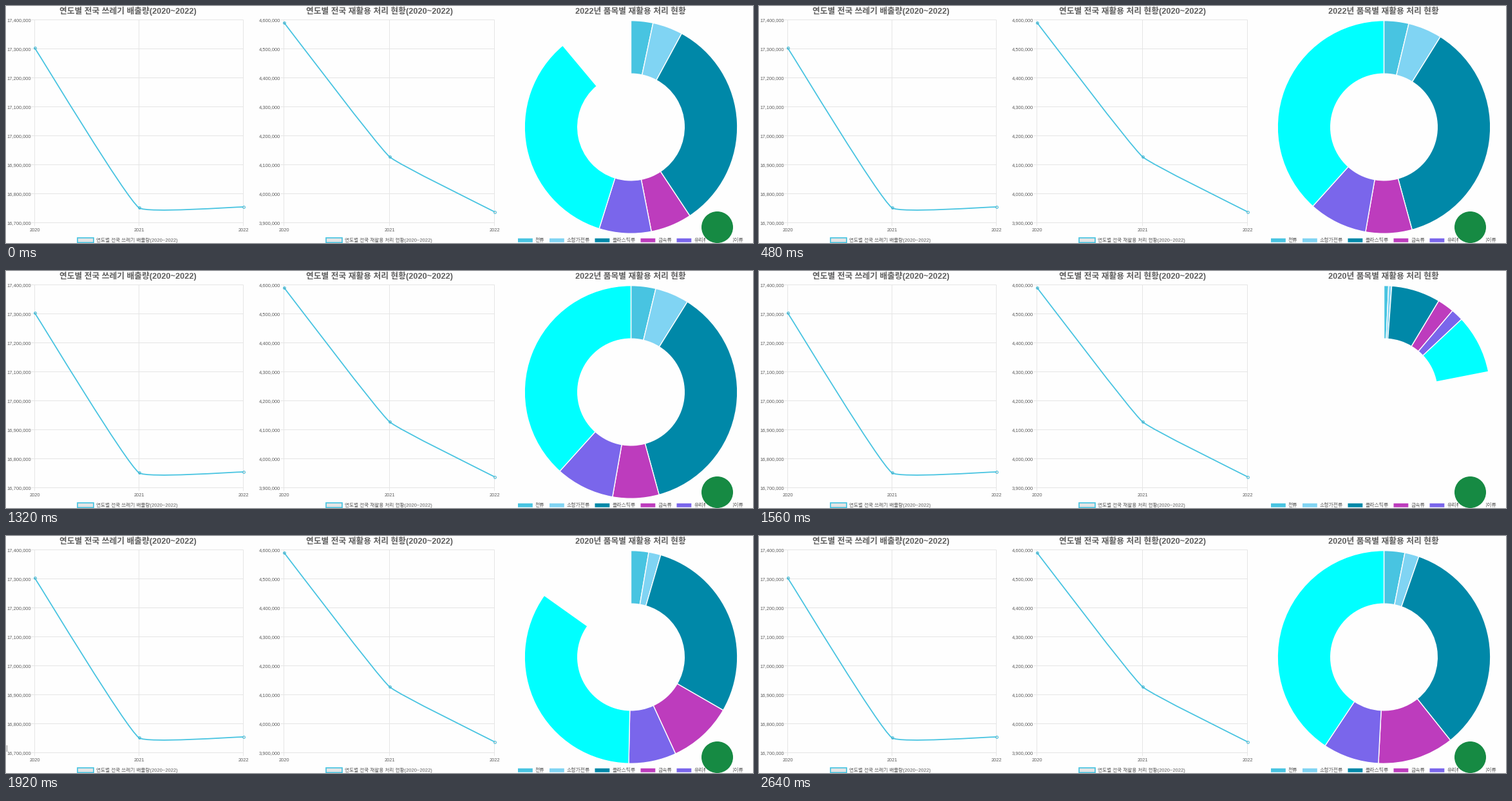
A matplotlib script that plays this animation: 1160 by 368 pixels, repeating every 2.76 s.

```python
import numpy as np
import matplotlib.pyplot as plt
from matplotlib.animation import FuncAnimation
from matplotlib.patches import Circle, PathPatch, Rectangle, Wedge
from matplotlib.path import Path

W, H, DPI = 1160, 368, 100
STEP, FRAMES = 120, 23
PX = 72 / DPI  # points per pixel
BG, GRID, INK, BLUE = "#fefefe", "#e5e5e5", "#5f5f5f", "#48c4e1"

plt.rcParams["font.family"] = ["Liberation Sans", "Noto Sans CJK JP"]

fig = plt.figure(figsize=(W / DPI, H / DPI), dpi=DPI, facecolor=BG)
ax = fig.add_axes([0, 0, 1, 1])
ax.set_xlim(0, W)
ax.set_ylim(H, 0)
ax.axis("off")


def label(x, y, text, size=7.5, ha="center", **kw):
    return ax.text(x, y, text, fontsize=size * PX, color=INK, ha=ha,
                   va="baseline", **kw)


def title(x, text):
    return label(x, 12, text, 12.8, weight="bold")


def rule(x0, y0, x1, y1):
    ax.plot([x0, x1], [y0, y1], color=GRID, lw=PX, zorder=1,
            solid_capstyle="butt", snap=False)


def box(x, y, w, h, **kw):
    ax.add_patch(Rectangle((x, y), w, h, snap=False, **kw))


def spline(points, tension=0.1):
    """Bezier path through three points with length-weighted handles."""
    a, b, c = np.array(points, float)
    d0, d1 = np.hypot(*(b - a)), np.hypot(*(c - b))
    pull = tension * (c - a) / (d0 + d1)
    verts = [a, a + tension * (b - a), b - d0 * pull, b,
             b + d1 * pull, c - tension * (c - b), c]
    return Path(verts, [Path.MOVETO] + [Path.CURVE4] * 6)


def line_chart(xs, ys, top, name, title_x, legend_x):
    y0, y1 = 21.5, 336.5
    for k in range(8):
        y = y0 + 45 * k
        rule(xs[0] - 5, y, xs[2], y)
        label(xs[0] - 5.7, y + 2.7, f"{top - 100_000 * k:,}", ha="right")
    for x, year in zip(xs, (2020, 2021, 2022)):
        rule(x, y0, x, y1 + 5)
        label(x, 349.9, str(year))

    points = list(zip(xs, ys))
    ax.add_patch(PathPatch(spline(points), fc="none", ec=BLUE,
                           lw=1.8 * PX, zorder=3))
    ax.plot(xs, ys, "o", ms=4 * PX, mfc=(0, 0, 0, 0.1), mec=BLUE,
            mew=0.9 * PX, zorder=4, snap=False)

    title(title_x, name)
    box(legend_x, 360, 25, 7.3, fc=GRID, ec=BLUE, lw=1.7 * PX)
    label(legend_x + 29, 366, name, 7.65, ha="left")


line_chart((44.5, 206.5, 368.5), (65, 313.3, 312), 17_400_000,
           "연도별 전국 쓰레기 배출량(2020~2022)", 189.7, 111)
line_chart((431.5, 595.5, 758.5), (25.5, 234, 319.5), 4_600_000,
           "연도별 전국 재활용 처리 현황(2020~2022)", 580, 497)

# Doughnut: kind, colour, legend position
KINDS = [("천류", BLUE, 795), ("소형가전류", "#80d4f3", 844),
         ("플라스틱류", "#0088a8", 914.5), ("금속류", "#bd3cbd", 985.5),
         ("유리류", "#7a66eb", 1041.5), ("종이류", "#00ffff", 1097)]
# Slice boundaries in degrees clockwise from the top
BOUNDS = {2022: np.array([0, 13.5, 32, 164.7, 190, 222, 360]),
          2020: np.array([0, 11.35, 19.15, 141.4, 183, 213.6, 360])}

ring_title = title(970, "")
slices = []
for kind, color, x in KINDS:
    wedge = Wedge((970.5, 188), 165.3, 0, 1, width=82.5, fc=color,
                  ec=BG, lw=1.4 * PX, joinstyle="bevel", zorder=3)
    slices.append(ax.add_patch(wedge))
    box(x, 360.8, 22.8, 6, fc=color, lw=0)
    label(x + 27, 366, kind, 7.9, ha="left")

# Floating button hiding part of the legend
box(1086, 358, 43, 10, fc=BG, lw=0, zorder=5)
ax.add_patch(Circle((1104.5, 343.5), 24.5, fc="#168a43", lw=0, zorder=6))
caret, = ax.plot([0.5, 0.5], [325, 334], color="#888888", lw=PX, zorder=5)


def ease_out_quart(t):
    return 1 - (1 - t) ** 4


def update(i):
    ms = i * STEP
    if ms < 1560:
        year, t = 2022, min(1, 0.423 + ms / 1000)
    else:
        year = 2020
        t = np.interp(ms, [1560, 1680, 1920, 2160, 2520],
                      [0.06, 0.175, 0.376, 0.645, 1])
    ring_title.set_text(f"{year}년 품목별 재활용 처리 현황")
    edges = BOUNDS[year] * ease_out_quart(t) - 90
    for wedge, a, b in zip(slices, edges, edges[1:]):
        wedge.set_theta1(a)
        wedge.set_theta2(b)
    caret.set_visible(1800 <= ms < 2280)
    return [ring_title, caret, *slices]


anim = FuncAnimation(fig, update, frames=FRAMES, interval=STEP,
                     repeat=True, blit=False)
plt.show()
```
